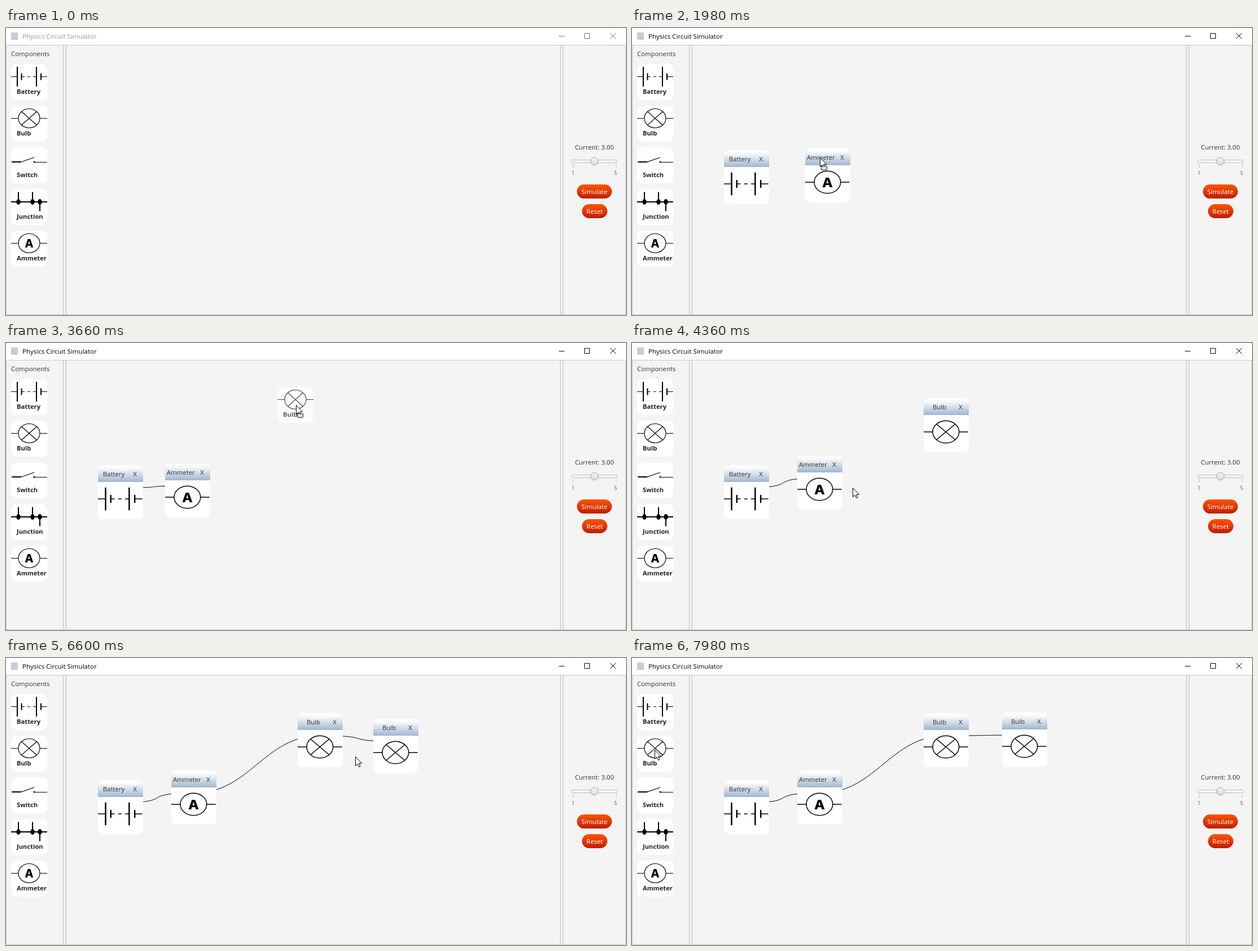
These frames come from a looping animation (1099x510 px, 8000 ms). An HTML page:

```html
<!DOCTYPE html>
<html lang="en">
<head>
<meta charset="utf-8">
<title>Physics Circuit Simulator</title>
<style>
html, body { margin: 0; width: 100%; height: 100%; overflow: hidden; background: #f4f4f4; }
svg { display: block; width: 1099px; height: 510px; }
text { font: 11.4px "Open Sans", "Noto Sans", sans-serif; fill: #333; }
.mid { text-anchor: middle; }
.bold { font-size: 11.2px; font-weight: 700; fill: #222; }
.tick { font-size: 9px; fill: #555; }
.btn { fill: #fff; }
.icon { fill: none; stroke: #000; stroke-width: 1.2; }
.icon .dot, .icon text { fill: #000; stroke: none; }
.icon text { font: 800 20px Inter, sans-serif; }
.icon .thick { stroke-width: 2; }
#links path { fill: none; stroke: #000; }
#bar text { font-size: 11.55px; fill: #000; }
#bar path { fill: none; stroke: #000; }
#bar.idle text { fill: #999; }
#bar.idle path { stroke: #777; }
</style>
</head>
<body>
<svg viewBox="0 0 1099 510">
  <defs>
    <linearGradient id="head" x2="0" y2="1">
      <stop offset="0" stop-color="#fff"/><stop offset=".2" stop-color="#f8fafc"/><stop offset="1" stop-color="#a0b6cf"/>
    </linearGradient>
    <linearGradient id="red" x2="0" y2="1">
      <stop offset="0" stop-color="#ff5400"/><stop offset="1" stop-color="#be1d00"/>
    </linearGradient>
    <linearGradient id="knob" x2="0" y2="1">
      <stop offset="0" stop-color="#f8f8f8"/><stop offset="1" stop-color="#d8d8d8"/>
    </linearGradient>
    <g id="Battery" class="icon">
      <path d="M0 0H11M18.5 0H24M29 0H34M39 0H45M53 0H64"/>
      <path class="thick" d="M11-17.5V17.5M18.5-6V6M45-17.5V17.5M53-6V6"/>
    </g>
    <g id="Bulb" class="icon">
      <path d="M0 0H13M51 0H64M18.5-12L45.5 12M18.5 12L45.5-12"/>
      <ellipse cx="32" rx="19" ry="17"/>
    </g>
    <g id="Switch" class="icon">
      <path class="thick" d="M1 3.5H18"/>
      <path d="M18 3.5L41-4.5M41 4H64"/>
      <circle class="dot" cx="41" cy="3.5" r="1.5"/>
    </g>
    <g id="Junction" class="icon">
      <path class="thick" d="M0 .5H64M13-17V0M38-17V0M51 0V17"/>
      <ellipse class="dot" cx="13" cy=".5" rx="3.7" ry="5"/>
      <ellipse class="dot" cx="38" cy=".5" rx="3.7" ry="5"/>
      <ellipse class="dot" cx="51" cy=".5" rx="3.7" ry="5"/>
    </g>
    <g id="Ammeter" class="icon">
      <path d="M0 0H13M51 0H64"/>
      <ellipse cx="32" rx="19" ry="17"/>
      <text class="mid" x="32" y="7.5">A</text>
    </g>
  </defs>

  <rect width="1099" height="510" fill="#f4f4f4"/>
  <rect width="1099" height="30" fill="#fff"/>
  <path d="M.5 30.5H1098.5V509.5H.5Z" fill="none" stroke="#c6c6c6"/>
  <g fill="#f0f0f0" stroke="#bfbfbf">
    <rect x="101.5" y="30.5" width="5" height="479"/>
    <rect x="982.5" y="30.5" width="5" height="479"/>
  </g>
  <g id="bar">
    <rect x="9" y="8" width="12" height="13" fill="#c3ced6"/>
    <text x="29" y="19">Physics Circuit Simulator</text>
    <path d="M980 14.5H990M1025.5 9.5H1034.5V18.5H1025.5ZM1071 9L1081 19M1081 9L1071 19"/>
  </g>

  <text x="9" y="50">Components</text>
  <g id="palette"></g>

  <text class="mid" x="1043" y="216">Current: 3.00</text>
  <rect x="1002.5" y="234.5" width="81" height="5" rx="2.5" fill="#f7f7f7" stroke="#bcbcbc"/>
  <path d="M1005.5 242V248M1081.5 242V248" stroke="#bbb"/>
  <circle cx="1043" cy="237" r="6.7" fill="url(#knob)" stroke="#a4a4a4"/>
  <text class="mid tick" x="1005" y="261">1</text>
  <text class="mid tick" x="1080.5" y="261">5</text>
  <rect x="1012" y="278" width="62" height="25" rx="12.5" fill="url(#red)"/>
  <text class="mid btn" x="1043" y="295">Simulate</text>
  <rect x="1021" y="313" width="45" height="25" rx="12.5" fill="url(#red)"/>
  <text class="mid btn" x="1043.5" y="330">Reset</text>

  <g id="links"></g>
  <g id="nodes"></g>
  <g id="ghosts" opacity=".7"></g>
  <g id="cursor">
    <path d="M.5.5V16.5L4.2 13.2L6.7 18.6L9 17.6L6.6 12.2H11.6Z" fill="#fff" stroke="#000"/>
    <rect id="drag" x="2.5" y="15.5" width="10" height="7" rx="1" fill="#ddd" stroke="#000" stroke-width="1.5" stroke-dasharray="1.5 1"/>
  </g>
</svg>
<script>
const LOOP = 8000, ENTER = 20, CLICK = 230;
const TYPES = ["Battery", "Bulb", "Switch", "Junction", "Ammeter"];
const pointer = [], nodes = [], ghosts = [], links = [], drags = [];
const $ = id => document.getElementById(id);

function add(parent, tag, html = "") {
  const el = document.createElementNS("http://www.w3.org/2000/svg", tag);
  el.innerHTML = html;
  return $(parent).appendChild(el);
}
const card = type => `<rect width="64.5" height="64" rx="10" fill="#fff"/>
  <use href="#${type}" y="22.5"/><text class="bold" x="10" y="53">${type}</text>`;
const box = type => `<rect width="80" height="96" rx="9" fill="#fff"/>
  <path d="M0 30V9Q0 0 9 0H71Q80 0 80 9V30Z" fill="url(#head)"/>
  <text class="mid" x="28" y="20">${type}</text><text class="mid" x="65.5" y="20">X</text>
  <use href="#${type}" transform="translate(0 60) scale(1.23 1.16)"/>`;

const place = (el, x, y) => el.setAttribute("transform", `translate(${x} ${y})`);
const show = (el, on) => { el.style.display = on ? "" : "none"; };
const during = (span, t) => t >= span.from && t < span.to;
const slot = i => [9, 64 + 74 * i];

// eased position along keys of time, x, y
function at(keys, t) {
  const i = keys.findIndex(k => k[0] > t);
  if (i === 0) return keys[0].slice(1);
  if (i < 0) return keys[keys.length - 1].slice(1);
  const [t0, ...p] = keys[i - 1], [t1, ...q] = keys[i];
  const u = (t - t0) / (t1 - t0), e = u * u * (3 - 2 * u);
  return p.map((v, k) => Math.round(v + (q[k] - v) * e));
}

// user actions: each one moves the pointer and changes the scene
const go = (t, x, y) => pointer.push([t, x, y]);

function drop(type, from, to, x, y) {
  const [sx, sy] = slot(TYPES.indexOf(type));
  go(from, sx + 33, sy + 32);
  go(to, x + 33, y + 32);
  const ghost = { from, to, el: add("ghosts", "g", card(type)) };
  ghosts.push(ghost);
  drags.push(ghost);
  nodes.push({ el: add("nodes", "g", box(type)), keys: [[to, x, y]] });
}

function move(node, from, to, x, y, gx = 26, gy = 16) {
  const { keys } = nodes[node], [x0, y0] = at(keys, from);
  go(from, x0 + gx, y0 + gy);
  go(to, x + gx, y + gy);
  keys.push([from, x0, y0], [to, x, y]);
  drags.push({ from, to });
}

function link(a, b, from, to) {
  const [ax, ay] = at(nodes[a].keys, from), [bx, by] = at(nodes[b].keys, to);
  go(from, ax + 68, ay + 78);
  go(to, bx + 18, by + 60);
  go(to + 120, bx + 18, by + 60);
  const wire = { a, b, from, to, el: add("links", "path") };
  links.push(wire);
  drags.push(wire);
}

TYPES.forEach((type, i) => place(add("palette", "g", card(type)), ...slot(i)));

go(ENTER, 90, 512);
drop("Battery", CLICK, 440, 176, 222);
drop("Ammeter", 720, 1320, 307, 214);
go(1160, 339, 255);
go(1230, 386, 258);
move(0, 1480, 1600, 163, 217);
move(1, 1960, 2250, 282, 214);
go(2860, 214, 297);
link(0, 1, 2920, 3160);
drop("Bulb", 3510, 3820, 517, 98);
go(3720, 631, 95);
move(1, 3980, 4140, 293, 200);
go(4360, 391, 257);
link(1, 2, 4440, 4860);
drop("Bulb", 5160, 5560, 651, 108);
go(5460, 746, 97);
go(5740, 485, 257);
link(2, 3, 6080, 6380);
go(6900, 347, 215);
go(7300, 660, 72);
move(3, 7370, 7440, 663, 102, 8, 2);
move(3, 7440, 7560, 656, 97, 8, 2);
go(7980, 40, 163);
pointer.sort((a, b) => a[0] - b[0]);

// wires leave and enter horizontally
function curve([x1, y1], [x2, y2]) {
  const d = x1 > x2 ? -100 : 100;
  return `M${x1} ${y1}C${x1 + d} ${y1} ${x2 - d} ${y2} ${x2} ${y2}`;
}

function draw(t) {
  const tip = at(pointer, t);
  const hub = i => at(nodes[i].keys, t).map(v => v + 40);
  $("bar").classList.toggle("idle", t < CLICK);
  show($("cursor"), t >= ENTER);
  show($("drag"), drags.some(d => during(d, t)));
  place($("cursor"), ...tip);
  nodes.forEach(n => {
    show(n.el, t >= n.keys[0][0]);
    place(n.el, ...at(n.keys, t));
  });
  ghosts.forEach(g => {
    show(g.el, during(g, t));
    place(g.el, tip[0] - 33, tip[1] - 32);
  });
  links.forEach(l => {
    show(l.el, t >= l.from);
    l.el.setAttribute("d", curve(hub(l.a), t < l.to ? tip : hub(l.b)));
  });
}

let start;
function tick(now) {
  start ??= now;
  draw((now - start) % LOOP);
  requestAnimationFrame(tick);
}
draw(0);
requestAnimationFrame(tick);
</script>
</body>
</html>
```
